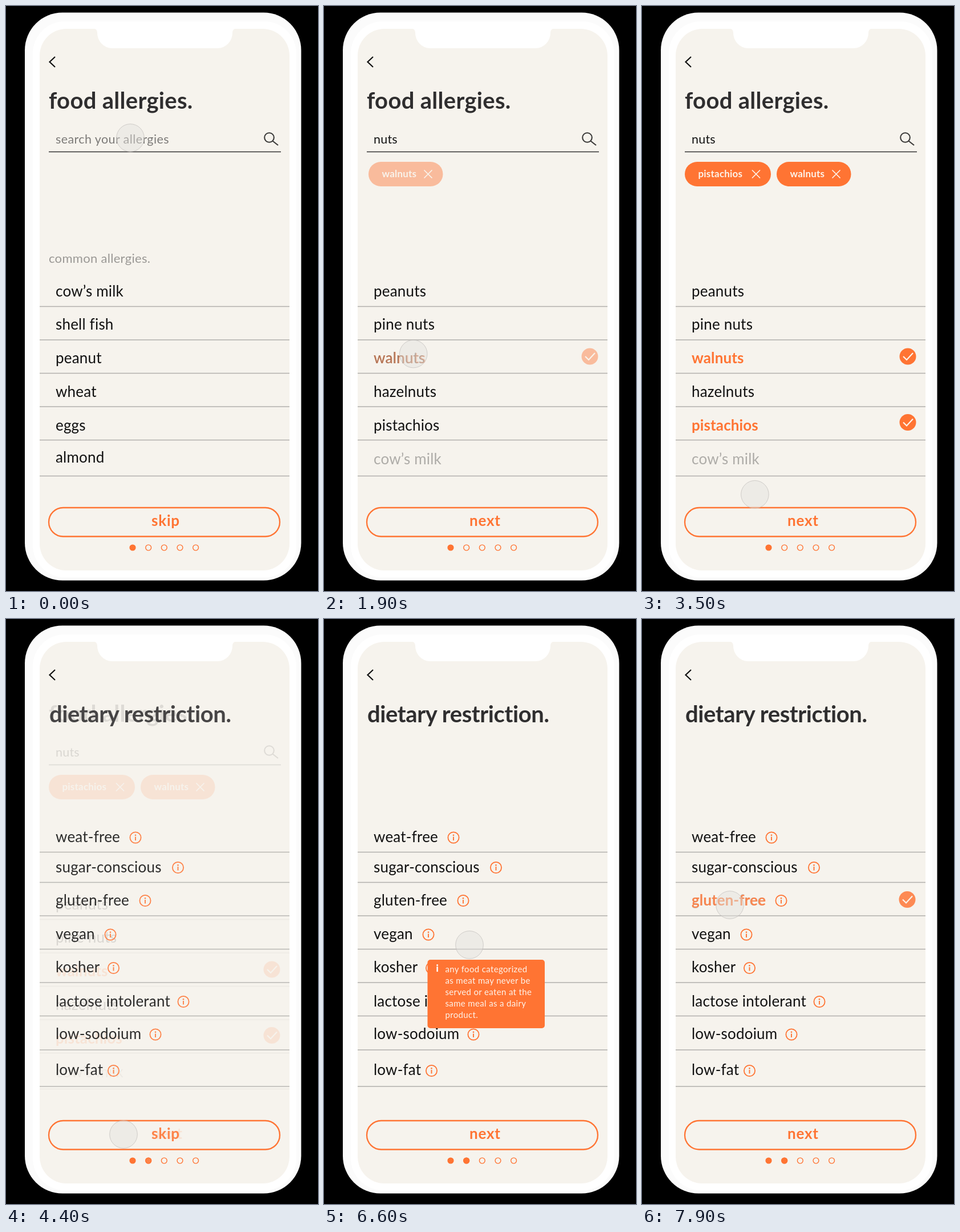
Write an HTML page that moves like this. It is 547x1025 px and loops after 8000 ms.

```html
<!DOCTYPE html>
<html lang="en">
<head>
<meta charset="utf-8">
<title>Allergy picker</title>
<style>
  html, body { margin: 0; width: 100%; height: 100%; overflow: hidden; background: #000; }
  svg { display: block; width: 100%; height: 100%; }
  text { font-family: Lato, "Open Sans", sans-serif; white-space: pre; }
</style>
</head>
<body>
<svg id="stage" viewBox="0 0 547 1025"></svg>
<script>
const LOOP = 8000;
const ORANGE = '#ff7433', CREAM = '#fdf3ea', INK = '#111', TITLE_INK = '#2f2e2f';

// Markup helpers
const text = (x, y, str, size, { fill = INK, weight = 400, spacing = 0.2 } = {}) =>
  `<text x="${x}" y="${y}" font-size="${size}" fill="${fill}" font-weight="${weight}" letter-spacing="${spacing}">${str}</text>`;
const group = (id, body, opacity = 1) => `<g id="${id}" opacity="${opacity}">${body}</g>`;
const stroke = (d, color, width, extra = '') =>
  `<path d="${d}" fill="none" stroke="${color}" stroke-width="${width}" ${extra}/>`;
const rule = y => stroke(`M59 ${y}H497`, '#b1afac', 1.3);
const item = (y, str) => text(87, y, str, 26);
const chosen = (y, str) => text(87, y, str, 26, { fill: ORANGE, weight: 700, spacing: 0.1 });
const title = (x, y, str, spacing) => text(x, y, str, 40, { fill: TITLE_INK, weight: 700, spacing });
const buttonLabel = str => text(255, 911, str, 26, { fill: ORANGE, weight: 700, spacing: 0.8 });

const tick = (x, y) =>
  `<circle cx="${x}" cy="${y}" r="14.5" fill="${ORANGE}"/>` +
  stroke(`M${x - 8} ${y}l6 6l11 -12`, CREAM, 2.2);
const info = (x, y) =>
  `<circle cx="${x}" cy="${y}" r="9.6" fill="none" stroke="${ORANGE}" stroke-width="1.8"/>` +
  `<circle cx="${x}" cy="${y - 4.3}" r="1.3" fill="${ORANGE}"/>` +
  stroke(`M${x} ${y - 1.6}V${y + 5}`, ORANGE, 1.9);
const chip = (x, width, str) =>
  `<rect x="${x}" y="273" width="${width}" height="43" rx="21.5" fill="${ORANGE}"/>` +
  text(x + 23.5, 300, str, 17, { fill: CREAM, weight: 700 }) +
  stroke(`M${x + width - 33} 287.5l14 14m0 -14l-14 14`, CREAM, 1.7);
const dot = (x, filled) =>
  `<circle cx="${x}" cy="949" r="4.9" fill="${filled ? ORANGE : 'none'}" stroke="${ORANGE}" stroke-width="1.4"/>`;

const phone = `
  <rect width="547" height="1025" fill="#000"/>
  <rect x="33" y="11.5" width="484.5" height="995" rx="66" fill="#fbfbfb"/>
  <rect x="47" y="27" width="462" height="974" rx="56" fill="#fff"/>
  <rect x="59" y="40" width="438" height="949" rx="47" fill="#f6f3ed"/>
  <path d="M153 39Q160 40 160 47A26 27 0 0 0 186 74H371A26 27 0 0 0 397 47Q397 40 404 39Z" fill="#fff"/>
  ${stroke('M86 89L76.5 98L86 107', INK, 2.2)}
  <rect x="75" y="879" width="405" height="50.5" rx="25.2" fill="none" stroke="${ORANGE}" stroke-width="2.3"/>
  ${[222, 249.7, 277.3, 305, 332.6].map((x, i) => dot(x, i === 0)).join('')}`;

const rowsY = [508.5, 567, 625.5, 685, 743.5];
const commonList = ['cow’s milk', 'shell fish', 'peanut', 'wheat', 'eggs'];

const allergies =
  title(75, 180, 'food allergies.', 0.3) +
  `<circle cx="461.5" cy="230.5" r="8.3" fill="none" stroke="#3a3938" stroke-width="2.1"/>` +
  stroke('M467.5 236.5L477 244', '#3a3938', 2.2) +
  stroke('M75 255.5H482', '#333', 1.6) +
  [526.5, 585, 643.5, 702, 760.5, 823.5].map(rule).join('') +
  group('common',
    text(87, 240.5, 'search your allergies', 21.5, { fill: '#7c7a78', spacing: 0.4 }) +
    text(75, 450, 'common allergies.', 22, { fill: '#9a9895', spacing: 0.3 }) +
    commonList.map((s, i) => item(rowsY[i], s)).join('') + item(799.5, 'almond')) +
  group('results',
    text(87, 240.5, 'nuts', 21.5) +
    item(rowsY[0], 'peanuts') + item(rowsY[1], 'pine nuts') + item(rowsY[3], 'hazelnuts') +
    group('walnutOff', item(rowsY[2], 'walnuts')) +
    group('pistachioOff', item(rowsY[4], 'pistachios'))) +
  group('faded', text(87, 803, 'cow’s milk', 26, { fill: '#aeaca8' })) +
  group('walnutOn', chosen(rowsY[2], 'walnuts') + tick(466, 614)) +
  group('pistachioOn', chosen(rowsY[4], 'pistachios') + tick(466, 729.5) + chip(75, 151, 'pistachios')) +
  group('walnutChip', chip(78, 130.5, 'walnuts'));

// label, baseline, info icon x and y
const diets = [
  ['weat-free', 391, 227, 383], ['sugar-conscious', 444, 301.5, 435.5],
  ['gluten-free', 502, 244, 493.5], ['vegan', 561, 183, 553],
  ['kosher', 619, 188.5, 611.5], ['lactose intolerant', 679, 311, 670.5],
  ['low-sodoium', 736, 262, 728], ['low-fat', 799, 188.5, 791.5]
];
const tipLines = ['any food categorized', 'as meat may never be', 'served or eaten at the',
  'same meal as a dairy', 'product.'];

const restrictions =
  title(76, 180.5, 'dietary restriction.', -0.4) +
  [408.5, 461.5, 520, 578.5, 637, 695.5, 755, 819].map(rule).join('') +
  diets.map(([s, y, ix, iy]) =>
    (s === 'gluten-free' ? group('glutenOff', item(y, s)) : item(y, s)) + info(ix, iy)).join('') +
  group('glutenOn', chosen(502, 'gluten-free') + tick(465, 491.5)) +
  dot(249.7, true) +
  group('tip',
    `<rect x="181.5" y="597" width="205.5" height="120" rx="5" fill="${ORANGE}"/>` +
    text(196.5, 618, 'i', 16, { fill: '#fff', weight: 900 }) +
    tipLines.map((s, i) => text(212.5, 619 + 20 * i, s, 15, { fill: CREAM, spacing: 0.35 })).join(''));

document.getElementById('stage').innerHTML = phone +
  group('allergies', allergies) + group('restrictions', restrictions) +
  group('skip', buttonLabel('skip')) + group('next', buttonLabel('next')) +
  '<circle id="touch" fill="#e2e0dc" stroke="#bfbdba" stroke-width="1"/>';

const el = Object.fromEntries([...document.querySelectorAll('[id]')].map(e => [e.id, e]));

// Motion helpers
const clamp = v => Math.min(1, Math.max(0, v));
const ramp = (t, from, to) => clamp((t - from) / (to - from));
const ease = u => (1 - Math.cos(Math.PI * u)) / 2;
const show = (id, value) => {
  el[id].setAttribute('opacity', value.toFixed(3));
  el[id].style.visibility = value > 0 ? 'visible' : 'hidden';
};

// Each move: start, end, destination, optional curve control point
const START = [218, 231];
const moves = [
  { from: 460, to: 1360, end: [157, 608] },
  { from: 1835, to: 2735, end: [135, 725] },
  { from: 2865, to: 3835, end: [206, 903], bend: [198, 814] },
  { from: 4750, to: 5400, end: [181.5, 592.5] },
  { from: 5400, to: 5640, end: [192.3, 610.3] },
  { from: 6100, to: 7100, end: [305, 501], bend: [261, 586.5] },
  { from: 7160, to: 7600, end: [154, 501] }
];
const presses = [180, 1550, 2780, 3950, 5750, 7130, 7660];

function touchAt(t) {
  let pos = START;
  for (const { from, to, end, bend } of moves) {
    if (t < from) break;
    const p = ease(ramp(t, from, to)), q = 1 - p, a = pos;
    pos = a.map((v, i) => {
      const c = bend ? bend[i] : (v + end[i]) / 2;
      return q * q * v + 2 * p * q * c + p * p * end[i];
    });
  }
  return pos;
}

function draw(t) {
  const results = ramp(t, 300, 750);
  const walnut = ramp(t, 1750, 2100);
  const pistachio = ramp(t, 2820, 3200);
  const second = ramp(t, 4050, 4450);
  const tip = ramp(t, 5900, 6200) - ramp(t, 7180, 7430);
  const gluten = ramp(t, 7680, 7950);
  const next = t < 4050 ? results : 1 - second + ramp(t, 5900, 6200);

  show('allergies', 1 - second);
  show('restrictions', second);
  show('common', 1 - results);
  show('results', results);
  show('faded', ramp(t, 700, 1350));
  show('walnutOff', 1 - walnut);
  show('walnutOn', walnut);
  show('walnutChip', walnut);
  show('pistachioOff', 1 - pistachio);
  show('pistachioOn', pistachio);
  show('tip', tip);
  show('glutenOff', 1 - gluten);
  show('glutenOn', gluten);
  show('skip', 1 - next);
  show('next', next);
  el.walnutChip.setAttribute('transform', `translate(${158 * ease(pistachio)} 0)`);

  // A press shrinks the touch point and makes it denser
  const press = Math.max(...presses.map(c => clamp((150 - Math.abs(t - c)) / 80)));
  const [x, y] = touchAt(t);
  el.touch.setAttribute('cx', x);
  el.touch.setAttribute('cy', y);
  el.touch.setAttribute('r', 24.3 - 1.3 * press);
  el.touch.setAttribute('fill-opacity', 0.45 + 0.3 * press);
  el.touch.setAttribute('stroke-opacity', 0.7 + 0.2 * press);
}

const began = performance.now();
function loop() {
  draw((performance.now() - began) % LOOP);
  requestAnimationFrame(loop);
}
loop();
</script>
</body>
</html>
```
